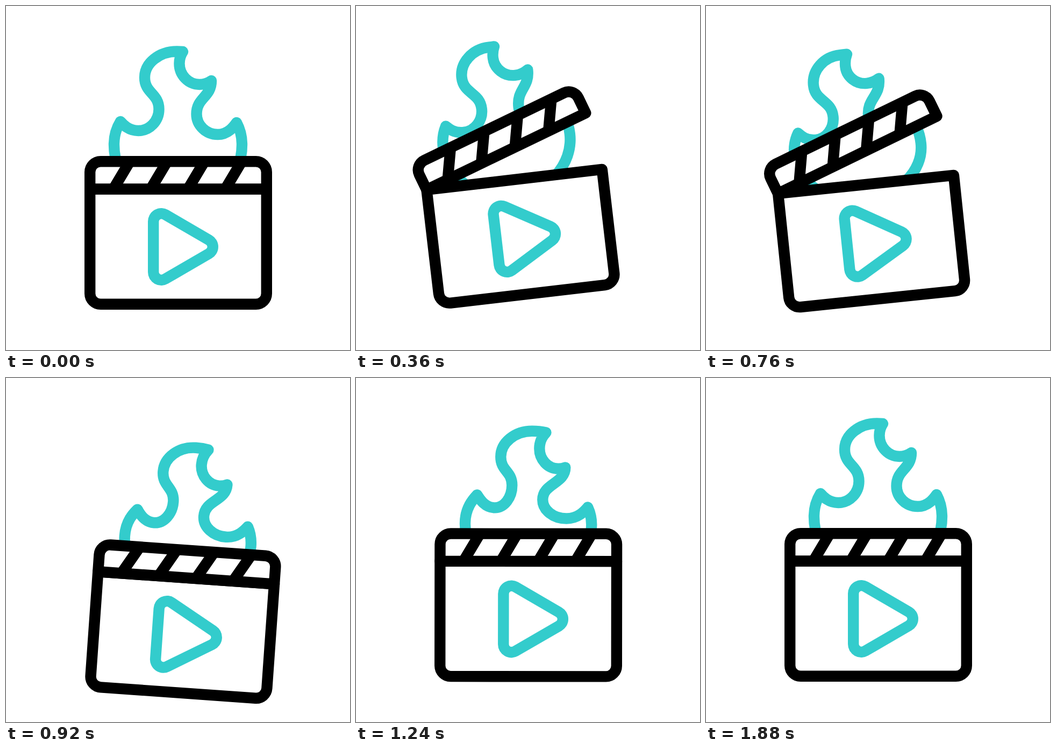
Animation of 640 by 640 pixels, one loop 2000 ms. Source, as an HTML page:

```html
<!DOCTYPE html>
<html lang="en">
<head>
<meta charset="utf-8">
<title>Burning clapperboard</title>
<style>
  html, body { margin: 0; width: 100%; height: 100%; overflow: hidden; background: #fff; }
  svg { display: block; width: 100%; height: 100%; }
  path { stroke: #000; stroke-width: 20.4; stroke-linecap: round; stroke-linejoin: round; fill: none; }
  .solid { fill: #fff; }
  .stripes { stroke-linecap: butt; }
  .teal { stroke: #33cccc; }
</style>
</head>
<body>
<svg viewBox="0 0 640 640">
  <g id="board">
    <path id="flame" class="teal"/>
    <path class="solid" d="M156.2 340.5H484.8V535a19.8 19.8 0 0 1-19.8 19.8H176a19.8 19.8 0 0 1-19.8-19.8Z"/>
    <path class="teal" d="M274.2 401A14.8 14.8 0 0 1 296.4 388.2L377.4 435.2A14.8 14.8 0 0 1 377.4 460.8L296.4 507.8A14.8 14.8 0 0 1 274.2 495Z"/>
    <g id="lid">
      <path class="solid" d="M156.2 340.5V309a19.8 19.8 0 0 1 19.8-19.8H465a19.8 19.8 0 0 1 19.8 19.8V340.5Z"/>
      <path class="stripes" d="M230.4 289.2l-30.6 51.3m100-51.3l-30.6 51.3m100-51.3l-30.6 51.3m100-51.3l-30.6 51.3"/>
    </g>
  </g>
</svg>
<script>
const LOOP = 2000, STEP = 40, HOLD = 120;
const [board, lid, flame] = ['board', 'lid', 'flame'].map(id => document.getElementById(id));

// [time, value] keys, joined with sine easing
const tracks = {
  tilt:  [[50, 0], [630, -12], [940, 4.2], [1265, 0]],
  drop:  [[630, 0], [940, 19.4], [1265, 0]],
  open:  [[50, 0], [630, -34.5], [920, 0]],
  left:  [[50, 0], [630, 1], [1100, 0], [1570, 1], [1870, 0]],
  right: [[630, 0], [1100, 1], [1570, 0]]
};

// Tangents in and out (v vertical, h horizontal, t tip), then x, y upright, leaning left, leaning right
const nodes = [
  ['tt', 329, 85,    298, 94.5,  367, 102.6],
  ['hh', 318, 84.5,  289, 95.3,  337, 99],
  ['vv', 258, 133,   235, 147,   277.5, 146],
  ['vv', 284.5, 192, 268, 211.5, 295.5, 196],
  ['hh', 246, 232,   230, 250.5, 265, 238.6],
  ['tt', 213, 215,   199, 237,   231.5, 212],
  ['vv', 201, 258,   191.5, 272, 205.5, 270],
  ['hh', 320, 377,   310, 368,   322, 377],
  ['vv', 439, 258,   428, 276,   440.5, 272],
  ['tt', 429, 217,   412.5, 224, 435.6, 244],
  ['hh', 394, 239,   376.5, 250.7, 395, 263.6],
  ['vv', 354.5, 201, 335.7, 212.7, 349.8, 229.3],
  ['vt', 382, 139,   358, 141.5, 396.8, 172],
  ['hh', 360, 146,   332, 149.5, 387, 173],
  ['vv', 322.5, 107, 295, 114.5, 352.6, 135]
];

function valueAt(keys, t) {
  if (t <= keys[0][0]) return keys[0][1];
  for (let i = 1; i < keys.length; i++) {
    const [t0, a] = keys[i - 1], [t1, b] = keys[i];
    if (t < t1) return a + (b - a) * (1 - Math.cos(Math.PI * (t - t0) / (t1 - t0))) / 2;
  }
  return keys[keys.length - 1][1];
}

// Handle leaving p towards q along the given tangent
function handle(p, q, type, k) {
  if (type === 'v') return [p[0], p[1] + k * (q[1] - p[1])];
  if (type === 'h') return [p[0] + k * (q[0] - p[0]), p[1]];
  return null;
}

const between = (p, q, k) => p.map((v, i) => v + k * (q[i] - v));

function flamePath(l, r) {
  const mix = (n, i) => n[i] + l * (n[i + 2] - n[i]) + r * (n[i + 4] - n[i]);
  const pts = nodes.map(n => [mix(n, 1), mix(n, 2)]);
  let d = 'M' + pts[0];
  nodes.forEach((n, i) => {
    const j = (i + 1) % nodes.length, p = pts[i], q = pts[j];
    const out = n[0][1], into = nodes[j][0][0];
    const k = out === into ? 0.5 : 0.55;
    let c1 = handle(p, q, out, k), c2 = handle(q, p, into, k);
    c1 = c1 || between(p, c2, 0.33);
    c2 = c2 || between(q, c1, 0.33);
    d += `C${c1} ${c2} ${q}`;
  });
  return d + 'Z';
}

function draw(ms) {
  let t = Math.floor(ms % LOOP / STEP) * STEP;
  if (t < HOLD) t = 0;
  const at = name => valueAt(tracks[name], t);
  board.setAttribute('transform', `translate(0 ${at('drop')}) rotate(${at('tilt')} 156.2 554.8)`);
  lid.setAttribute('transform', `rotate(${at('open')} 156.2 340.5)`);
  flame.setAttribute('d', flamePath(at('left'), at('right')));
}

const start = performance.now();
function tick() {
  draw(performance.now() - start);
  requestAnimationFrame(tick);
}
tick();
</script>
</body>
</html>
```
